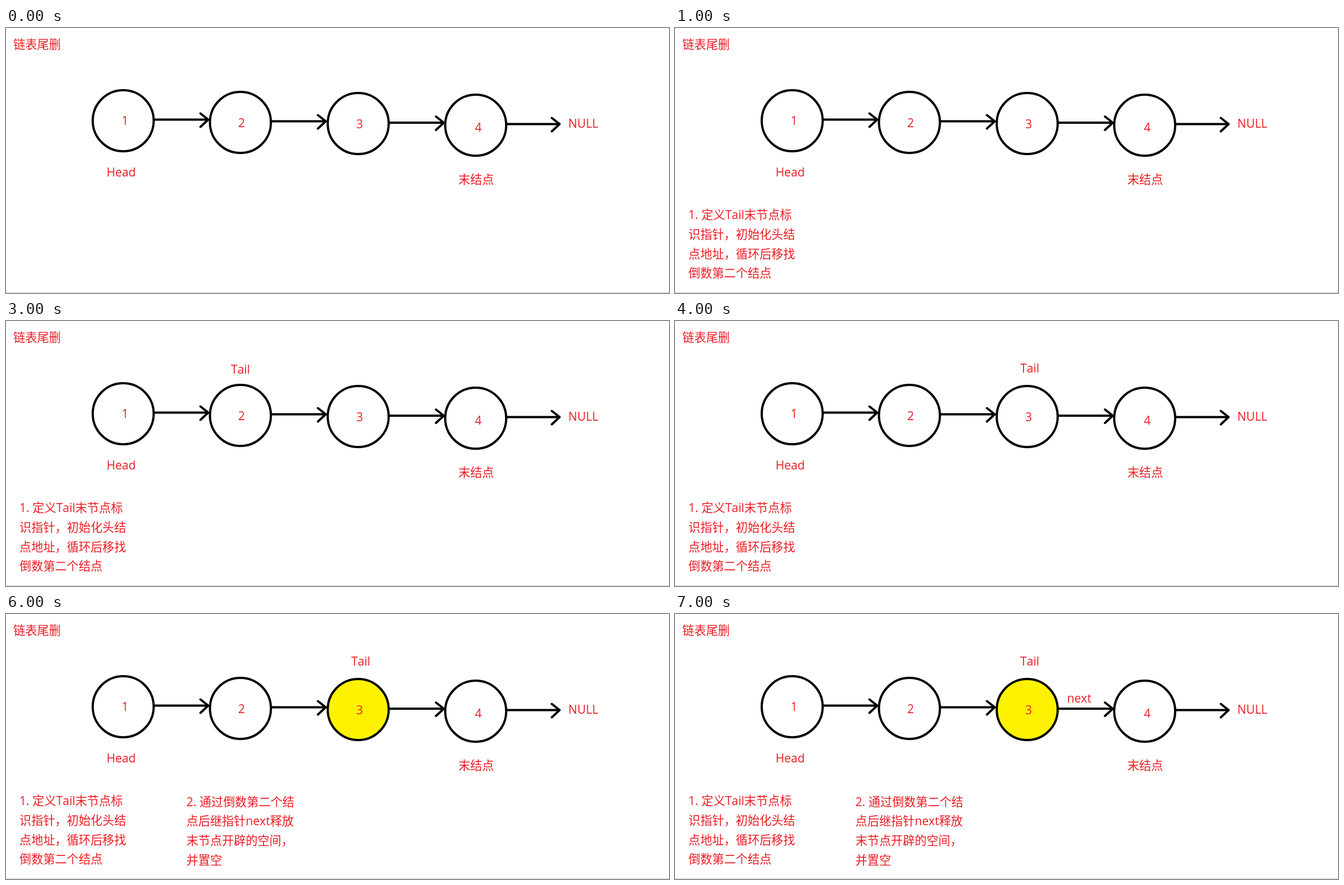
These frames come from a looping animation (1185x473 px, 8000 ms). An HTML page:

```html
<!DOCTYPE html>
<html lang="zh-CN">
<head>
<meta charset="utf-8">
<style>
html, body { margin: 0; width: 100%; height: 100%; overflow: hidden; background: #fff; }
svg { display: block; width: 1185px; height: 473px; }
text {
  font: 21.2px "Open Sans", "Noto Sans CJK SC", "Noto Sans CJK", sans-serif;
  font-kerning: none;
  fill: #ed1c24;
}
</style>
</head>
<body>
<svg id="stage" viewBox="0 0 1185 473"></svg>
<script>
const LOOP = 8000;
const stage = document.getElementById('stage');
const timed = [];

function add(tag, attrs, content = '') {
  const el = document.createElementNS('http://www.w3.org/2000/svg', tag);
  for (const key in attrs) el.setAttribute(key, attrs[key]);
  el.textContent = content;
  return stage.appendChild(el);
}

const label = (x, y, content, anchor = 'start') =>
  add('text', { x, y, 'text-anchor': anchor }, content);

// Visible only from one time to the other
function show(el, from, to = LOOP) {
  timed.push({ el, from, to });
}

function note(x, y, from, lines) {
  lines.forEach((line, i) => show(label(x, y + i * 34.8, line), from));
}

function arrow(x1, x2, y) {
  add('path', {
    d: `M${x1} ${y}H${x2}M${x2 - 14} ${y - 11}L${x2} ${y}L${x2 - 14} ${y + 13}`,
    fill: 'none', stroke: '#000', 'stroke-width': 4,
    'stroke-linecap': 'round', 'stroke-linejoin': 'round'
  });
}

add('rect', { y: 472, width: 1185, height: 1, fill: '#d0d0d0' });

// Centre of each node, then the place of its number
const nodes = [
  [209.5, 165.5, 212.7, 172.5],
  [419, 168.5, 421, 177],
  [629.5, 170.5, 632, 178.5],
  [839.5, 173.5, 844, 185]
];
const circles = nodes.map(([cx, cy, x, y], i) => {
  const circle = add('circle', { cx, cy, r: 54.5, fill: '#fff', stroke: '#000', 'stroke-width': 4 });
  label(x, y, i + 1, 'middle');
  return circle;
});

arrow(264, 361.5, 163.5);
arrow(474, 571.5, 166.5);
arrow(685, 782.5, 169);
arrow(895, 989.5, 171.5);

label(13.3, 36.5, '链表尾删');
label(179.7, 265, 'Head');
label(808.5, 278, '末结点');
label(1005, 178, 'NULL');

note(24, 341, 1000, ['1. 定义Tail末节点标', '识指针，初始化头结', '点地址，循环后移找', '倒数第二个结点']);
note(322.5, 342.5, 6000, ['2. 通过倒数第二个结', '点后继指针next释放', '末节点开辟的空间，', '并置空']);

show(label(188, 84.5, 'Tail'), 2000, 3000);
show(label(402, 94, 'Tail'), 3000, 4000);
show(label(617, 92, 'Tail'), 4000);
show(label(700.7, 158, 'next'), 7000);

function draw(now) {
  const t = now % LOOP;
  for (const { el, from, to } of timed)
    el.setAttribute('visibility', t >= from && t < to ? 'visible' : 'hidden');
  circles[2].setAttribute('fill', t >= 5000 ? '#fff200' : '#fff');
}

const start = performance.now();
function tick() {
  draw(performance.now() - start);
  requestAnimationFrame(tick);
}
tick();
</script>
</body>
</html>
```
